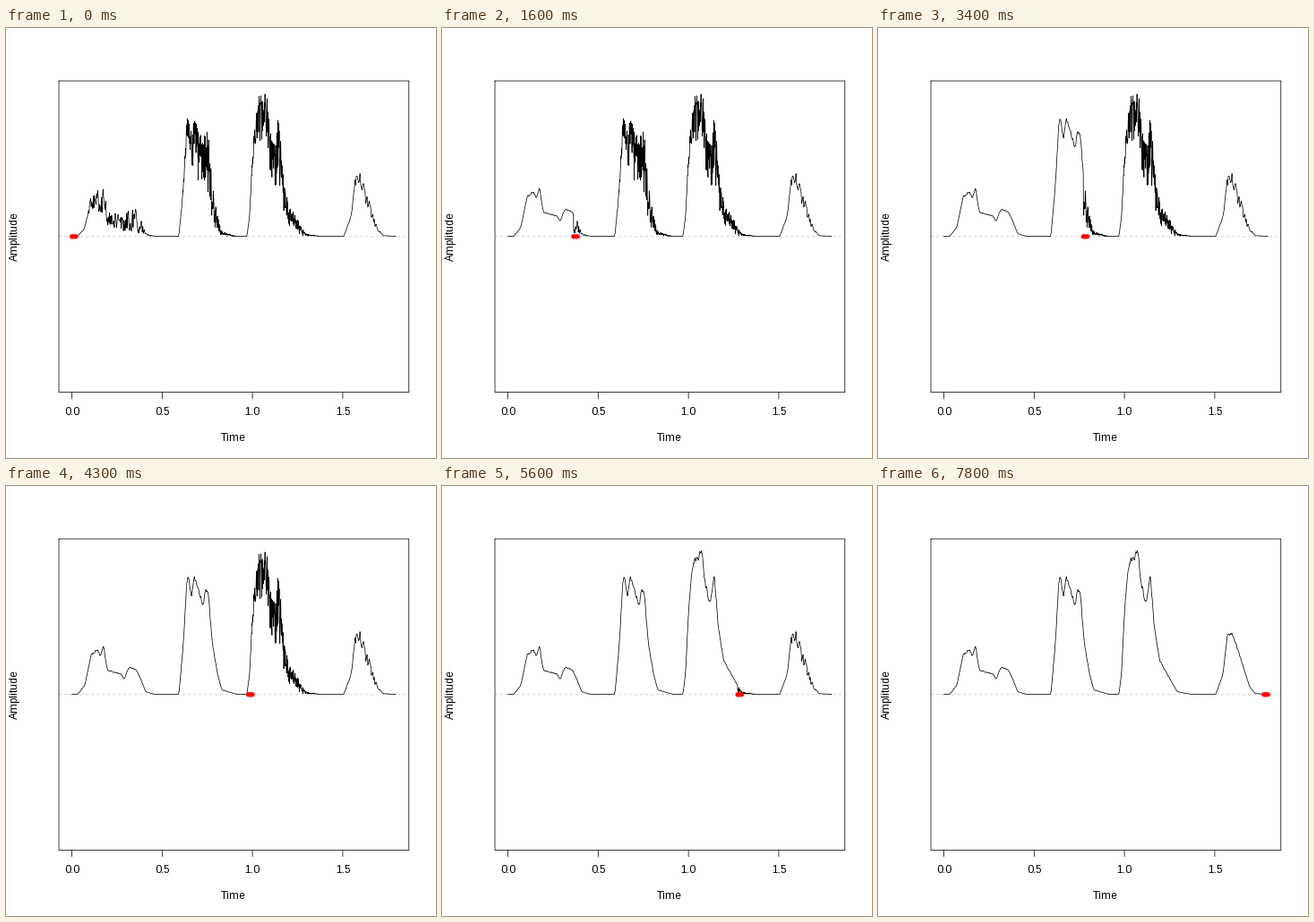
Animation, 480 px wide and 480 px high, one loop 7.9 s. Source, as a matplotlib script:

```python
import numpy as np
import matplotlib.pyplot as plt
from matplotlib.animation import FuncAnimation

plt.rcParams.update({"font.family": "Liberation Sans", "path.simplify": False,
                     "text.hinting_factor": 1})

SIZE = 480
FRAMES = 79
LEFT, RIGHT, TOP, BOTTOM = 59.04, 449.76, 59.04, 406.56
ZERO = (TOP + BOTTOM) / 2
X0, X1 = 73.51, 435.29
PX_PER_S = 201.6
WINDOW = (X1 - X0) / FRAMES
STEP = 0.2
THIN = 0.75
rng = np.random.default_rng(11)

# Each pulse: grain of its noise in px, depth of its noise,
# then key points (x, height) of its envelope
PULSES = [
    (0.6, 1.0, [(80, 0), (88, 10), (95, 44), (102, 50), (105, 43), (109, 54),
                (113, 27), (128, 23), (132, 17), (137, 30), (145, 28),
                (150, 18), (156, 3), (166, 0)]),
    (0.25, 1.0, [(193, 0), (198, 57), (202, 129), (204, 130), (207, 107),
                 (210, 132), (220, 98), (223, 118), (226, 110), (230, 60),
                 (236, 23), (241, 5), (258, 0)]),
    (0.25, 1.0, [(269, 0), (272, 25), (275, 90), (278, 130), (282, 149),
                 (287, 153), (290, 163), (293, 128), (299, 101), (304, 133),
                 (308, 80), (314, 39), (322, 24), (334, 3), (350, 0)]),
    (0.8, 0.5, [(377, 0), (385, 22), (390, 66), (395, 68), (400, 55),
                (408, 30), (415, 8), (421, 1), (435, 0)]),
]


def noise(x, grain):
    """Random values from 0 to 1, a new one every grain px."""
    knots = np.arange(x[0], x[-1] + grain, grain)
    return np.interp(x, knots, rng.random(knots.size))


def pulse(x, grain, depth, points):
    """Envelope of one pulse and its raw signal, noisier towards the end."""
    xs, heights = np.array(points).T
    env = np.interp(x, xs, heights)
    env = np.convolve(env, np.full(9, 1 / 9), mode="same")
    env *= 1 + 0.05 * (noise(x, 0.8) - 0.5)
    progress = np.clip((x - xs[0]) / (xs[-1] - xs[0]), 0, 1)
    dip = np.minimum(1.15 * depth * progress ** 0.7, 1.05)
    raw = env * (1 + 0.1 * dip - dip * noise(x, grain) ** 1.3)
    return env, np.maximum(raw, 0)


x = np.arange(X0, X1, STEP)
smooth, raw = ZERO - 0.2 - sum(np.array(pulse(x, *p)) for p in PULSES)

fig = plt.figure(figsize=(SIZE / 72, SIZE / 72), dpi=72, facecolor="white")
ax = fig.add_axes([0, 0, 1, 1])
ax.set(xlim=(0, SIZE), ylim=(SIZE, 0))
ax.axis("off")


def stroke(xs, ys, color="black", lw=THIN, **kw):
    line, = ax.plot(xs, ys, color=color, lw=lw, snap=False, **kw)
    return line


def label(x, y, text, **kw):
    ax.text(x, y, text, size=12, ha="center", va="baseline",
            rotation_mode="anchor", **kw)


stroke([LEFT, RIGHT], [ZERO, ZERO], "#bebebe", dashes=(4, 4),
       dash_capstyle="butt")
stroke([LEFT, RIGHT, RIGHT, LEFT, LEFT], [TOP, TOP, BOTTOM, BOTTOM, TOP],
       solid_joinstyle="round", solid_capstyle="round")
for sec in (0, 0.5, 1, 1.5):
    tx = X0 + sec * PX_PER_S
    stroke([tx, tx], [BOTTOM, BOTTOM + 7.2], solid_capstyle="round")
    label(tx, 432.5, f"{sec:.1f}")
label((LEFT + RIGHT) / 2, 461.3, "Time")
label(12.96, ZERO, "Amplitude", rotation=90)

curve = stroke(x, raw, solid_joinstyle="round", solid_capstyle="round")
marker = stroke([], [], "red", 5.25, solid_capstyle="round")


def draw(i):
    start = X0 + i * WINDOW
    curve.set_data(x, np.where(x < start, smooth, raw))
    marker.set_data([start, start + WINDOW], [ZERO, ZERO])
    return curve, marker


anim = FuncAnimation(fig, draw, frames=FRAMES, interval=100,
                     init_func=lambda: draw(0), repeat=True, repeat_delay=0)
plt.show()
```
